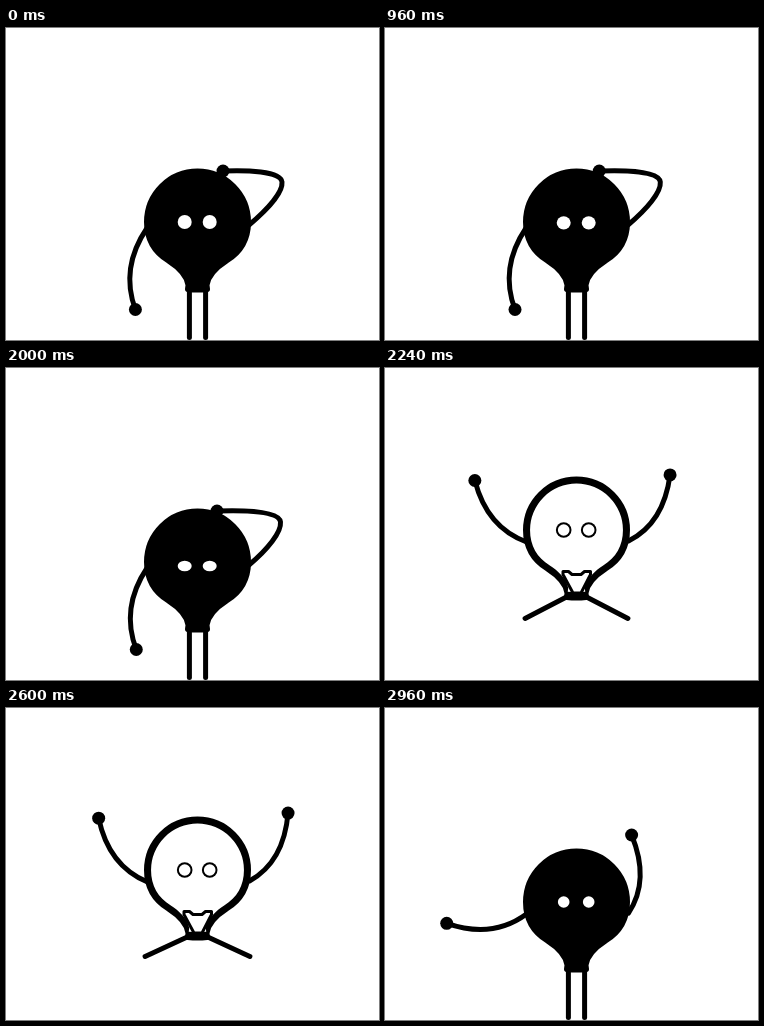
Recreate the animation shown at these times as an HTML page with a canvas. Size 373x312 px, loop 3000 ms.

```html
<!DOCTYPE html>
<html>
<head>
<meta charset="utf-8">
<style>
html, body { margin: 0; width: 100%; height: 100%; overflow: hidden; background: #fff; }
canvas { display: block; }
</style>
</head>
<body>
<canvas id="stage" width="373" height="312"></canvas>
<script>
const ctx = document.getElementById('stage').getContext('2d');
const LOOP = 3000, STEP = 40;
const JUMP = 2240, LAND = 2920, LIFT = 32;
const CX = 191.5, CY = 194;

const body = new Path2D(`M182.5 257 C181 247 171 238 162.5 232.5 C148.5 224 141 211 141 194
  A50.5 50.5 0 0 1 242 194 C242 211 234.5 224 220.5 232.5 C212 238 202 247 200.5 257
  L201 261 Q191.5 262 182 261 Z`);
const filament = new Path2D(`M178 235.5 H183.5 L187 238.5 H196 L199.5 235.5 H205.5 V238.5
  L196 257 H188 L178 238.5 Z`);

const wave = (t, period) => Math.cos(2 * Math.PI * t / period);
const ramp = (t, from, to) => {
  const u = Math.min(1, Math.max(0, (t - from) / (to - from)));
  return u * u * (3 - 2 * u);
};

function stroke(path, width) {
  ctx.lineWidth = width;
  ctx.stroke(path);
}

function dot(x, y, rx, ry = rx) {
  ctx.beginPath();
  ctx.ellipse(x, y, rx, ry, 0, 0, 2 * Math.PI);
  ctx.fill();
}

function limb(d, handX, handY) {
  stroke(new Path2D(d), 5);
  dot(handX, handY, 6.5);
}

// Raised arm, swung outward around its shoulder by deg
function raisedArm(x, y, side, bend, hand, deg) {
  const a = deg * Math.PI / 180, c = Math.cos(a), s = Math.sin(a);
  const turn = ([px, py]) => [x + side * (px * c - py * s), y + px * s + py * c];
  const [bx, by] = turn(bend), [hx, hy] = turn(hand);
  limb(`M${x} ${y} Q${bx} ${by} ${hx} ${hy}`, hx, hy);
}

function raisedArms(leftDeg, rightDeg) {
  raisedArm(141.5, 206, -1, [36, -22], [38.5, -70.5], leftDeg);
  raisedArm(243.5, 205, 1, [31, -24], [27.7, -73], rightDeg);
}

function scratchArms(t) {
  const lx = 133 - 3.6 * wave(t, 1060);
  const rx = 213 + 4 * wave(t, 300);
  const elbow = 276 + (rx - 217) * 0.25;
  limb(`M141 200 Q${114 + (lx - 129.5) * 0.45} 240 ${lx} 281.5`, lx, 281.5);
  limb(`M243 197 C262 181 ${elbow + 1} 164 ${elbow} 154
    C${elbow - 1} 143 240 142 ${rx} 143`, rx, 143);
}

function legs(airborne, swing) {
  for (const side of [-1, 1]) {
    const x = CX + side * 8.1;
    const a = (16 + swing) * Math.PI / 180;
    const foot = airborne
      ? [x + side * 48.8 * Math.cos(a), 260 + 48.8 * Math.sin(a)]
      : [x, 309.5];
    stroke(new Path2D(`M${x} 260 L${foot[0]} ${foot[1]}`), 5);
  }
}

// White inside of the glowing bulb, leaving a rim that thins towards the neck
function glow() {
  ctx.save();
  ctx.translate(CX, CY);
  ctx.scale(0.92, 0.92);
  ctx.translate(-CX, -CY);
  ctx.fillStyle = '#fff';
  ctx.fill(body);
  ctx.restore();
  stroke(filament, 3);
}

function eyes(lit, radius, squint) {
  for (const x of [CX - 12.8, CX + 12.2]) {
    if (lit) dot(x, CY, 7.8);
    ctx.fillStyle = '#fff';
    dot(x, CY + 8 * squint, radius, radius - 3.6 * squint);
    ctx.fillStyle = '#000';
  }
}

function draw(t) {
  const airborne = t >= JUMP && t < LAND;
  const waving = t >= JUMP - 80;
  const lit = airborne && (t - JUMP) % 280 < 120;
  const swing = 4 + 8 * Math.sin(2 * Math.PI * (t - 2800) / 332);
  const squint = ramp(t, 900, 1200) * (1 - ramp(t, 1900, 2100));

  ctx.fillStyle = '#fff';
  ctx.fillRect(0, 0, 373, 312);
  ctx.save();
  if (airborne) ctx.translate(0, -LIFT);
  ctx.fillStyle = ctx.strokeStyle = '#000';
  ctx.lineCap = ctx.lineJoin = 'round';

  legs(airborne, swing);
  if (airborne) raisedArms(swing, swing);
  else if (waving) raisedArms(68, -18.5);

  ctx.fill(body);
  stroke(body, 6);
  if (lit) glow();
  if (!waving) scratchArms(t);
  eyes(lit, waving ? 5.8 : 7, squint);
  ctx.restore();
}

const start = performance.now();
function tick() {
  const t = (performance.now() - start) % LOOP;
  draw(Math.floor(t / STEP) * STEP);
  requestAnimationFrame(tick);
}
tick();
</script>
</body>
</html>
```
